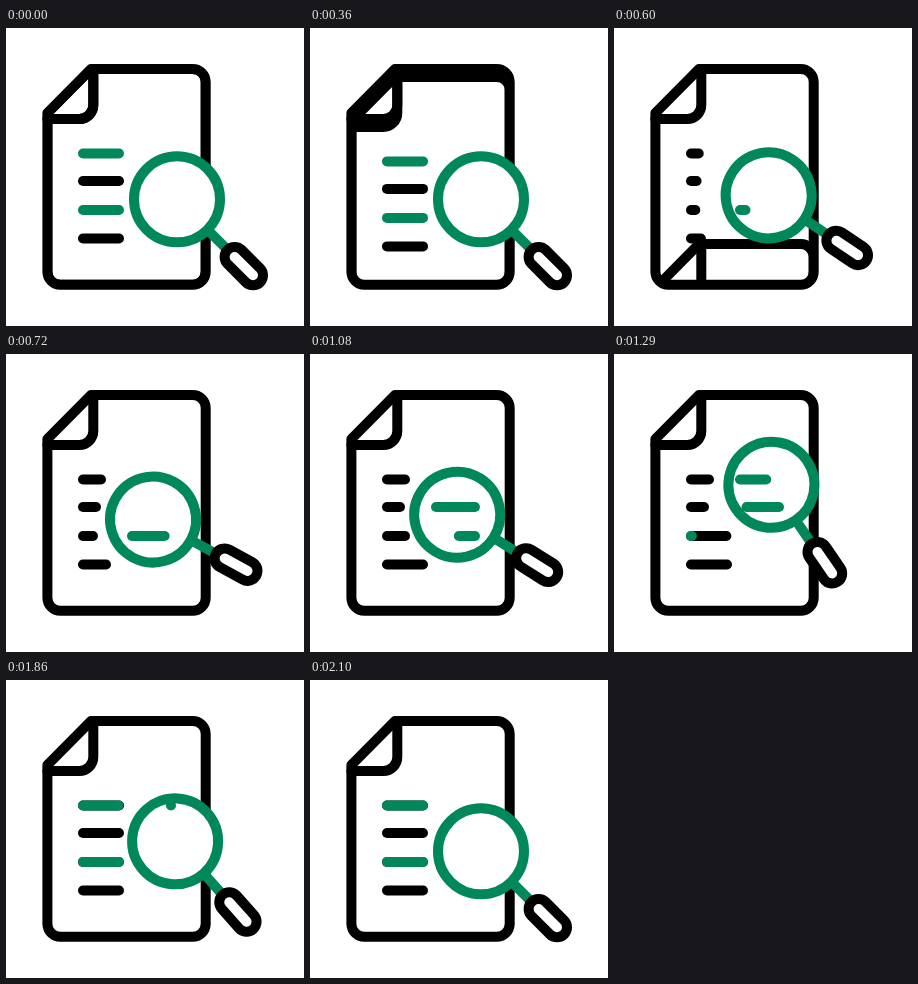
These frames come from a looping animation (298x298 px, 2.25 s). An HTML page with a canvas:

```html
<!DOCTYPE html>
<html lang="en">
<head>
<meta charset="utf-8">
<title>Document search</title>
<style>
html, body { margin: 0; width: 100%; height: 100%; overflow: hidden; background: #fff; }
canvas { display: block; width: 298px; height: 298px; }
</style>
</head>
<body>
<canvas id="stage" width="298" height="298"></canvas>
<script>
const LOOP = 2250, GREEN = '#00875a', BLACK = '#000';
const LEFT = 77, LENGTH = 36;
const c = document.getElementById('stage').getContext('2d');

const sheet = new Path2D('M85 41H186.7a13 13 0 0 1 13 13V243.8a13 13 0 0 1-13 13H54.4a13 13 0 0 1-13-13V85Z');
const fold = new Path2D('M87.3 41V77a14 14 0 0 1-14 14H41.4');

// Each line first appears as a stub, is completed later, and may then be inked green
const lines = [
  { y: 125.5, stub: 18, complete: [1450, 1860], ink: [1520, 1890] },
  { y: 153, stub: 13, complete: [1330, 1810] },
  { y: 182, stub: 10, complete: [930, 1330], ink: [1260, 1560] },
  { y: 210.5, stub: 23, complete: [730, 1000] }
];

function ease(t, start, end) {
  const u = Math.min(1, Math.max(0, (t - start) / (end - start)));
  return (1 - Math.cos(Math.PI * u)) / 2;
}

function stroke(x1, x2, y, color) {
  c.strokeStyle = color;
  c.beginPath();
  c.moveTo(x1, y);
  c.lineTo(x2, y);
  c.stroke();
}

function outline() {
  c.strokeStyle = BLACK;
  c.stroke(sheet);
  c.stroke(fold);
}

function drawFreshLines(t) {
  for (const { y, stub, complete, ink } of lines) {
    const length = stub * ease(t, 500, 720) + (LENGTH - stub) * ease(t, ...complete);
    if (t > 500) stroke(LEFT, LEFT + length, y, BLACK);
    if (ink && t > ink[0]) stroke(LEFT, LEFT + LENGTH * ease(t, ...ink), y, GREEN);
  }
}

function drawOldPage(t) {
  c.save();
  c.clip(sheet);
  c.translate(0, 218 * ease(t, 310, 720));
  c.fillStyle = '#fff';
  c.fill(sheet);
  for (const { y, ink } of lines) stroke(LEFT, LEFT + LENGTH, y, ink ? GREEN : BLACK);
  outline();
  c.restore();
}

function drawLens(t) {
  // Progress of the three moves: onto the text, up the lines, back to rest
  const a = ease(t, 390, 730), b = ease(t, 990, 1400), d = ease(t, 1600, 1973);
  const x = 171 - 24 * a + 15 * b * b + 9 * d;
  const y = 171.3 - 5.8 * a - 41.7 * b + 47.5 * d;
  const angle = 45 - 16.5 * a + 32.5 * b - 16 * d;

  c.save();
  c.translate(x, y);
  c.rotate(angle * Math.PI / 180);
  c.fillStyle = '#fff';
  stroke(43, 75, 0, GREEN);
  c.beginPath();
  c.arc(0, 0, 43, 0, 7);
  c.fill();
  c.stroke();
  c.strokeStyle = BLACK;
  c.beginPath();
  c.roundRect(71.5, -10, 46, 20, 10);
  c.fill();
  c.stroke();
  c.restore();

  c.beginPath();
  c.arc(x, y, 47, 0, 7);
  drawReading(t);
}

// Lines seen through the lens, from the third up to the first
function drawReading(t) {
  c.save();
  c.clip();
  for (let k = 0; k < 3; k++) {
    const write = 540 + 300 * k, erase = 930 + 270 * k, gone = erase + 270 + 65 * k;
    if (t > write && t < gone) {
      const from = 126 + 39 * ease(t, erase, gone);
      const to = 126 + 39 * ease(t, write, write + 245);
      stroke(from, to, lines[2 - k].y, GREEN);
    }
  }
  c.restore();
}

function draw(now) {
  const t = now % LOOP;
  c.clearRect(0, 0, 298, 298);
  c.lineWidth = 10;
  c.lineCap = c.lineJoin = 'round';
  drawFreshLines(t);
  if (t < 720) drawOldPage(t);
  outline();
  drawLens(t);
}

let start;
function tick(now) {
  start ??= now;
  draw(now - start);
  requestAnimationFrame(tick);
}
draw(0);
requestAnimationFrame(tick);
</script>
</body>
</html>
```
